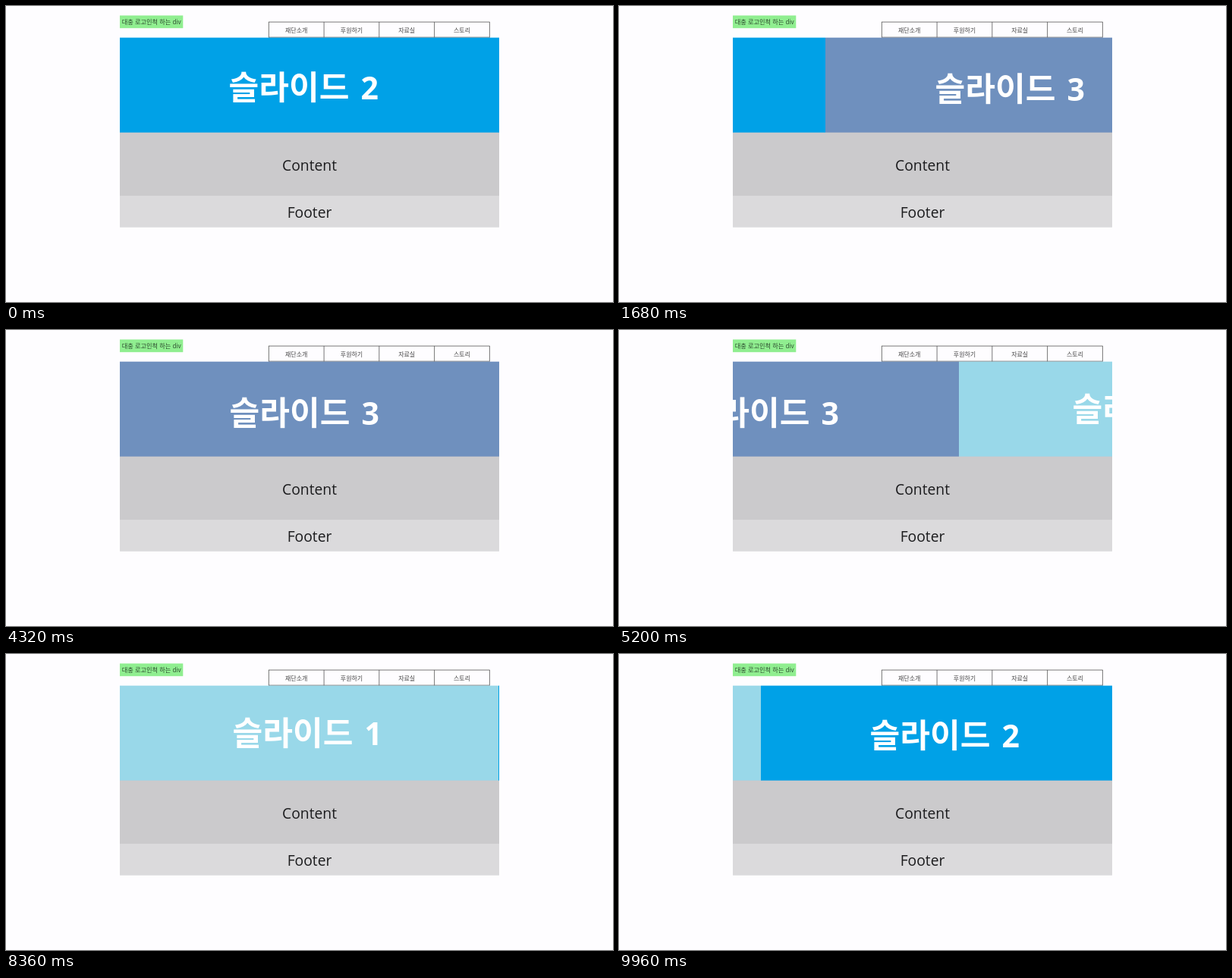
Recreate the animation shown at these times as an HTML page. Size 800 by 390 pixels, loop 10 s.

```html
<!DOCTYPE html>
<html lang="ko">
<head>
<meta charset="utf-8">
<title>Slider layout</title>
<style>
  html, body { margin: 0; width: 100%; height: 100%; overflow: hidden; background: #fefdff; }
  svg { display: block; }
  text { font-family: "Open Sans", "Noto Sans CJK KR", "Noto Sans CJK", sans-serif; fill: #1c1c1e; }
  .logo { font-size: 8.2px; fill: #2c4a2e; }
  .menu { font-size: 8px; fill: #444; text-anchor: middle; }
  .label { font-size: 19.3px; text-anchor: middle; }
  .title { font-size: 43.2px; font-weight: 700; fill: #fff; }
  .title tspan { font-size: 41px; }
</style>
</head>
<body>
<svg width="800" height="390" viewBox="0 0 800 390">
  <rect x="150" y="12.5" width="83.3" height="16.7" fill="#90ee90"/>
  <text class="logo" x="152.8" y="24">대충 로고인척 하는 div</text>

  <path d="M346 21.1H637.5M346 41.2H637.5M346.4 21V41.5M419.1 21V41.5M491.8 21V41.5M564.6 21V41.5M637.4 21V41.5"
        fill="none" stroke="#555" stroke-width=".8"/>
  <text class="menu" x="382.7" y="34.6">재단소개</text>
  <text class="menu" x="455.5" y="34.6">후원하기</text>
  <text class="menu" x="528.2" y="34.6">자료실</text>
  <text class="menu" x="601" y="34.6">스토리</text>

  <!-- The grey blocks reach under their neighbours so that no seam shows. -->
  <rect x="150" y="240" width="500" height="51.67" fill="#dbdadc"/>
  <rect x="150" y="160" width="500" height="90" fill="#cbcacc"/>
  <text class="label" x="400" y="216.5">Content</text>
  <text class="label" x="400" y="279">Footer</text>

  <svg x="150" width="500" height="390" overflow="hidden">
    <g id="strip"></g>
  </svg>
</svg>
<script>
  const LOOP = 10000, SLIDE_TIME = 2000, WIDTH = 500;
  const starts = [338, 4323, 8310];
  const slides = {
    1: { color: '#99d8e9', x: 149.5, y: 120.3 },
    2: { color: '#00a1e7', x: 143.5, y: 123.3 },
    3: { color: '#6f90be', x: 144.5, y: 125.1 }
  };

  const strip = document.getElementById('strip');
  strip.innerHTML = [2, 3, 1, 2].map((n, i) => {
    const { color, x, y } = slides[n];
    return `<g transform="translate(${i * WIDTH})">
      <rect y="41.67" width="${WIDTH}" height="125" fill="${color}"/>
      <text class="title" x="${x}" y="${y}">슬라이드<tspan x="${x + 174}">${n}</tspan></text>
    </g>`;
  }).join('');

  const swing = p => 0.5 - Math.cos(Math.PI * p) / 2;
  const progress = (t, start) => swing(Math.min(1, Math.max(0, (t - start) / SLIDE_TIME)));

  // The loop cuts hard while the third slide is still moving.
  const origin = performance.now();
  function draw() {
    const t = (performance.now() - origin) % LOOP;
    const moved = starts.reduce((sum, start) => sum + progress(t, start), 0);
    strip.setAttribute('transform', `translate(${-Math.round(moved * WIDTH)})`);
    requestAnimationFrame(draw);
  }
  draw();
</script>
</body>
</html>
```
